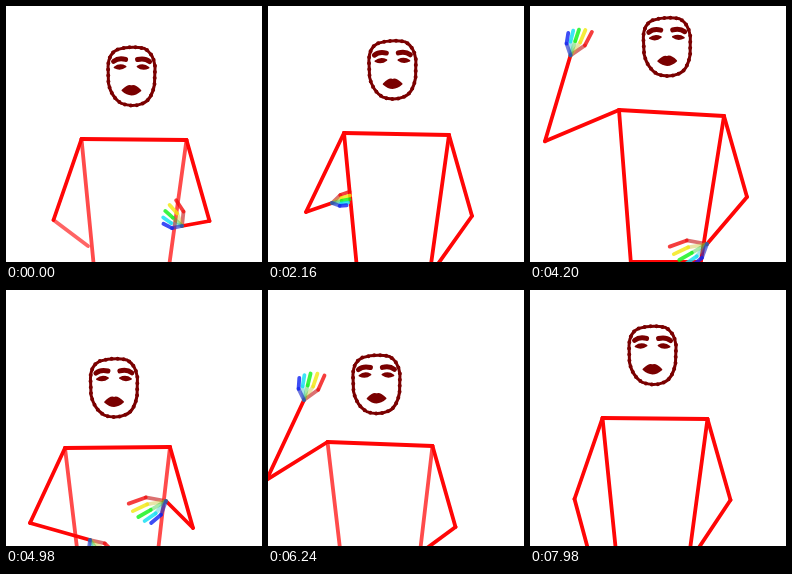
These frames come from a looping animation (256 by 256 pixels, 8 s). An HTML page with a canvas:

```html
<!DOCTYPE html>
<html lang="en">
<head>
<meta charset="utf-8">
<title>Gesturing figure</title>
<style>
  html, body { margin: 0; height: 100%; overflow: hidden; background: #fff; }
  canvas { display: block; width: 100vw; height: 100vh; }
</style>
</head>
<body>
<canvas id="stage" width="256" height="256"></canvas>
<script>
const ctx = document.getElementById('stage').getContext('2d');
const LOOP = 8000, STEP = 60;
const SKIN = '#7a0000', BONE = '#ff0606', LIMB = 3.8;
const FINGER_HUES = [0, 57, 122, 185, 235];

// chest: x, y, shoulder slope. head and elbow are offsets from chest and left shoulder.
// Hands: direction, angle between fingers (degrees), reach; a reach of 0 is out of sight.
const relaxed = {
  chest: [125, 128.5, 1], head: [-2.5, -63], elbow: [-28, 81],
  leftWrist: [69, 300], leftHand: [-75, -20, 30],
  rightWrist: [150, 286], rightHand: [150, -20, 34]
};
const opening = {
  ...relaxed, chest: [128, 133.5, 1], leftWrist: [82, 240], leftHand: [0, 18, 0],
  rightWrist: [176, 220], rightHand: [222, -27, 24]
};
const sweep = {
  ...relaxed, chest: [128, 129.5, 5], head: [8, -54], elbow: [-71, 53],
  leftWrist: [50, 174], leftHand: [38, 18, 38], rightWrist: [191, 281]
};
const gather = {
  ...relaxed, chest: [128.5, 128, 2], head: [-4, -64], elbow: [-38, 79],
  leftWrist: [64, 197], leftHand: [-12, 16, 19]
};
const rise = {
  ...relaxed, chest: [141.5, 107, 6], head: [-4.5, -66], elbow: [-47, 68],
  leftWrist: [56, 171], leftHand: [47, 22, 24], rightWrist: [177, 238]
};
const crouch = {
  ...relaxed, chest: [111.5, 157.5, -1], head: [-3.5, -59.5], elbow: [-35, 75],
  leftWrist: [84, 250], leftHand: [55, 21, 25], rightWrist: [160, 211]
};
const wave = {
  ...crouch, chest: [112, 154, 4], elbow: [-61, 38],
  leftWrist: [36, 110], leftHand: [-76, -20, 29], rightWrist: [140, 272]
};
const reachUp = { ...rise, elbow: [-75, 30], leftWrist: [40, 45], leftHand: wave.leftHand };

const TIMELINE = [
  [0, opening], [1140, sweep], [2160, gather], [2640, gather], [3240, rise],
  [4320, reachUp], [4980, crouch], [6240, wave], [6840, relaxed], [LOOP, relaxed]
];

const mix = (a, b, k) => a + (b - a) * k;
const clamp = (v, lo, hi) => Math.min(hi, Math.max(lo, v));
const polar = ([x, y], degrees, r) => {
  const a = degrees * Math.PI / 180;
  return [x + r * Math.cos(a), y + r * Math.sin(a)];
};

function poseAt(t) {
  const next = TIMELINE.findIndex(([time]) => time > t);
  const [t0, from] = TIMELINE[next - 1], [t1, to] = TIMELINE[next];
  const k = (t - t0) / (t1 - t0), eased = k * k * (3 - 2 * k);
  const pose = {};
  for (const part in from) {
    pose[part] = from[part].map((v, i) => mix(v, to[part][i], eased));
  }
  return pose;
}

function line(points, color, width, alpha = 1) {
  ctx.globalAlpha = alpha;
  ctx.strokeStyle = color;
  ctx.lineWidth = width;
  ctx.beginPath();
  points.forEach(([x, y]) => ctx.lineTo(x, y));
  ctx.stroke();
  ctx.globalAlpha = 1;
}

function drawHand(wrist, [direction, spread, reach]) {
  FINGER_HUES.forEach((hue, i) => {
    const fan = spread * (i - 2), length = reach * (1.1 - .08 * i);
    const knuckle = polar(wrist, direction + fan, length * .55);
    const tip = polar(wrist, direction + fan * .65, length);
    const outer = i === 0 || i === 4;
    line([wrist, knuckle], `hsl(${hue} 70% 46%)`, LIMB, outer ? .65 : .4);
    line([knuckle, tip], `hsl(${hue} 90% 50%)`, LIMB, .8);
  });
}

function drawArm(shoulder, elbow, wrist, hand) {
  const visible = hand[2] > 8;
  line([shoulder, elbow], BONE, LIMB);
  line([elbow, wrist], BONE, LIMB, visible ? 1 : .62);
  if (visible) drawHand(wrist, hand);
}

function drawTorso(left, right, [x, y]) {
  const hipX = 125 + (x - 128) * .8, hipY = y + 149;
  const alpha = clamp(1 - (left[1] - 128) / 14, .72, 1);
  line([left, [hipX - 35, hipY]], BONE, LIMB, alpha);
  line([right, [hipX + 35, hipY]], BONE, LIMB, alpha);
  line([[hipX - 35, hipY], [hipX + 35, hipY]], BONE, LIMB);
  line([left, right], BONE, LIMB);
}

const OUTLINE = new Path2D('M-14-27Q0-31 13-28Q22-23 23.5-10L23 8Q20 24 11 27Q1 31-10 27Q-20 21-23 7L-23.5-10Q-23-23-14-27Z');
const BROWS = new Path2D('M-18-15Q-13-19-6-17M6-17Q13-19 18-15');
const EYES = new Path2D('M-17-9Q-12-13-6-10Q-11-6-17-9ZM6-10Q12-13 17-9Q11-6 6-10Z');
const MOUTH = new Path2D('M-9 14Q-3 8 0 10Q3 8 9 14Q0 22-9 14Z');

function drawFace(x, y, tilt) {
  ctx.save();
  ctx.translate(x, y);
  ctx.rotate(tilt * Math.PI / 180);
  ctx.strokeStyle = ctx.fillStyle = SKIN;
  ctx.lineWidth = 3;
  ctx.stroke(OUTLINE);
  ctx.lineWidth = 4;
  ctx.setLineDash([0, 6]);
  ctx.stroke(OUTLINE);
  ctx.setLineDash([]);
  ctx.lineWidth = 5;
  ctx.stroke(BROWS);
  ctx.lineWidth = 1.8;
  for (const shape of [EYES, MOUTH]) {
    ctx.fill(shape);
    ctx.stroke(shape);
  }
  ctx.restore();
}

function draw(time) {
  const step = Math.floor(time % LOOP / STEP);
  const pose = poseAt(step < 2 ? 0 : step * STEP);
  const [x, y, slope] = pose.chest;
  const left = [x - 52.5, y - slope / 2], right = [x + 52.5, y + slope / 2];
  const [headX, headY] = pose.head, [elbowX, elbowY] = pose.elbow;
  ctx.fillStyle = '#fff';
  ctx.fillRect(0, 0, 256, 256);
  ctx.lineCap = ctx.lineJoin = 'round';
  drawTorso(left, right, pose.chest);
  drawArm(left, [left[0] + elbowX, left[1] + elbowY], pose.leftWrist, pose.leftHand);
  drawArm(right, [right[0] + 23, right[1] + 81], pose.rightWrist, pose.rightHand);
  drawFace(x + headX, y + headY, (headX + 3) * .6);
}

const start = performance.now();
function tick() {
  draw(performance.now() - start);
  requestAnimationFrame(tick);
}
tick();
</script>
</body>
</html>
```
